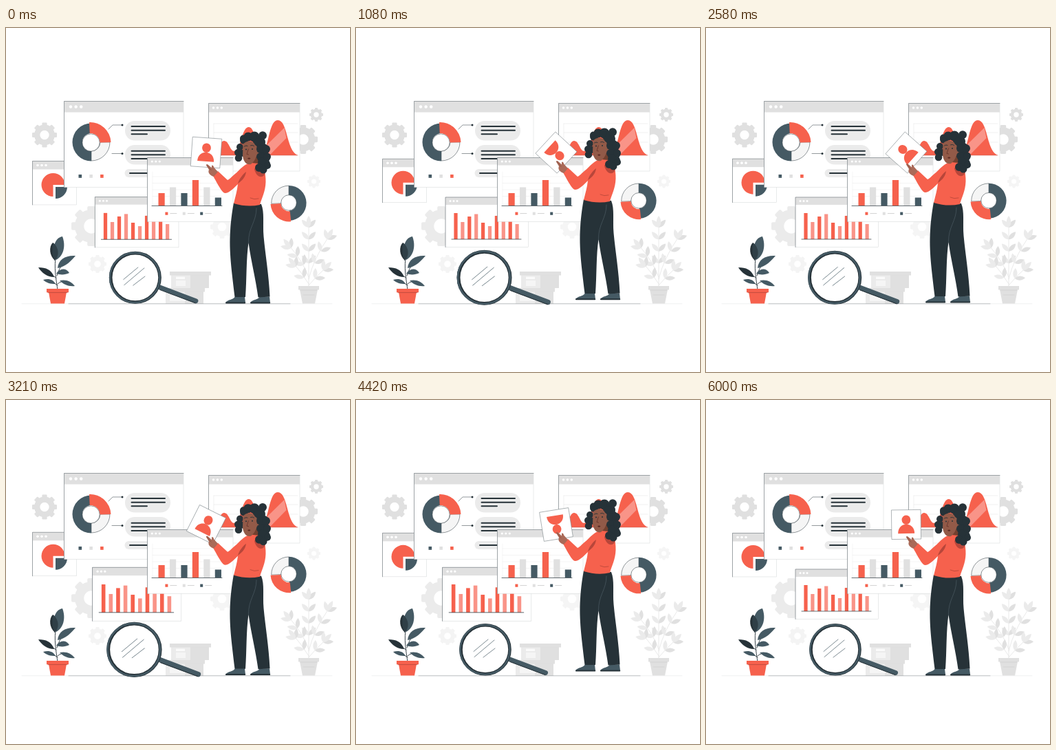
These frames come from a looping animation (500 px wide and 500 px high, 6.04 s). An HTML page:

```html
<!DOCTYPE html>
<html lang="en">
<head>
<meta charset="utf-8">
<style>
html, body { margin: 0; width: 100%; height: 100%; overflow: hidden; background: #fff; }
svg { display: block; width: 100vw; height: 100vh; }
</style>
</head>
<body>
<svg id="stage" viewBox="0 0 500 500"></svg>
<script>
const RED = '#f6614d', PINK = '#f99488', SLATE = '#455a64', INK = '#263238', GREY = '#e0e0e0', PALE = '#ebebeb';
const SKIN = '#925a48';
const LOOP = 6040, LEAD = 33;

const path = (d, fill, extra = '') => `<path d="${d}" fill="${fill}" ${extra}/>`;
const line = (d, color = INK, width = .7, extra = '') =>
  path(d, 'none', `stroke="${color}" stroke-width="${width}" stroke-linecap="round" ${extra}`);
const rect = (x, y, w, h, fill, extra = '') =>
  `<rect x="${x}" y="${y}" width="${w}" height="${h}" fill="${fill}" ${extra}/>`;
const dot = (x, y, r, fill, extra = '') => `<circle cx="${x}" cy="${y}" r="${r}" fill="${fill}" ${extra}/>`;
const group = (id, body) => `<g id="${id}">${body}</g>`;
const outline = `stroke="${INK}" stroke-width=".5"`;

// Angles run clockwise from the top.
function sector(cx, cy, R, r, from, to, fill, extra) {
  const at = (a, q) => {
    const k = a * Math.PI / 180;
    return `${(cx + q * Math.sin(k)).toFixed(2)} ${(cy - q * Math.cos(k)).toFixed(2)}`;
  };
  const big = to - from > 180 ? 1 : 0;
  return path(`M${at(from, R)}A${R} ${R} 0 ${big} 1 ${at(to, R)}L${at(to, r)}` +
    (r ? `A${r} ${r} 0 ${big} 0 ${at(from, r)}` : '') + 'Z', fill, extra);
}

function gear(x, y, R, fill) {
  let teeth = '';
  for (let i = 0; i < 8; i++)
    teeth += rect(-R * .2, -R, R * .4, R * .4, fill, `rx="${R * .07}" transform="rotate(${i * 45})"`);
  return `<g transform="translate(${x} ${y})">${teeth}` +
    `<circle r="${R * .6}" fill="none" stroke="${fill}" stroke-width="${R * .46}"/></g>`;
}

function panel(x, y, w, h, bar, dots, gap, r) {
  let s = rect(x, y, w, h, '#fff', 'stroke="#d2d5d6" stroke-width=".5"') + rect(x, y, w, bar, GREY) +
    line(`M${x} ${y + h}V${y}H${x + w}`, '#6c757a', .6);
  for (let i = 0; i < 3; i++) s += dot(dots + i * gap, y + bar / 2, r, '#fff');
  return s;
}

function leaf(x, y, len, wid, angle, fill) {
  return path(`M0 0C${-wid} ${-len * .3} ${-wid * .8} ${-len * .7} 0 ${-len}C${wid * .8} ${-len * .7} ${wid} ${-len * .3} 0 0Z`,
    fill, `transform="translate(${x} ${y}) rotate(${angle})"`);
}

function backdrop() {
  return gear(56, 155.5, 18, GREY) + gear(451, 126, 10, GREY) + gear(432, 162, 21, GREY) +
    gear(447.5, 223, 9.5, '#f5f5f5') + gear(124, 288, 29, PALE) +
    gear(133, 343, 13, '#f4f4f4') + gear(314, 289, 17, '#f5f5f5');
}

function piePanel() {
  return panel(38.5, 193.5, 64, 63.5, 12, 46, 6, 1.8) +
    sector(68.5, 228, 17, 0, 180, 450, RED) + sector(72, 231, 17, 0, 90, 180, SLATE);
}

function donutPanel() {
  let s = panel(84.5, 106.5, 173.5, 125, 16, 94, 7.6, 2.2);
  s += sector(124, 166, 27, 13, 90, 180, '#f5f5f5', outline) +
    sector(124, 166, 27.5, 13, 180, 360, SLATE) +
    sector(122.5, 167, 30, 14, -3, 88, RED) +
    dot(123.5, 166.5, 12.6, '#fff', outline) +
    line('M149 147L155 141H168M154 182.5H168', INK, .5) + dot(169, 141, 1.5, INK) + dot(169, 182.5, 1.5, INK);
  [SLATE, GREY, RED].forEach((c, i) => s += rect(105.5 + i * 15.8, 213, 4.6, 4.8, c));
  s += rect(173, 135, 66, 28.5, PALE, 'rx="14"') + rect(173, 170, 66, 28.5, PALE, 'rx="14"') +
    rect(172.5, 205, 60, 12, PALE, 'rx="6"');
  return s + line('M182.5 143H231M182.5 148.8H231M182.5 154.3H205M182.5 178.8H231M182.5 184.3H231M182.5 190H205M180 211H215', INK, 1.9);
}

function hillPanel() {
  return panel(294.5, 109.5, 132.5, 98.5, 13, 301.5, 5.9, 1.8) +
    line('M302 139V185M302 139H424M302 152H424M302 166H424', '#e3e3e3', .5) +
    path('M302 185C309 182 310 164 317 164C325 164 326 183 334 178C342 172 343 144 353 144C363 144 364 181 371 181C382 181 381 134 395 134C410 134 407 178 424 185Z', RED) +
    path('M376 173L404.5 145L407.5 160L384 184H372Z', PINK) +
    line('M302 185H424', '#c85a4d', .5);
}

function barPanel() {
  let s = panel(130, 246, 120.3, 72.5, 11, 137, 5, 1.5);
  [269, 282, 274, 270.5, 283, 288, 273, 281, 280.5, 285].forEach((y, i) =>
    s += rect(142.4 + i * 9.9, y, 5.2, 307 - y, i % 2 ? PINK : RED));
  return s + line('M139 307H240');
}

function columnPanel() {
  let s = panel(205.5, 188.5, 124.5, 93, 11, 212.3, 5.5, 1.6);
  s += line('M213 216H314M213 225.5H314M213 235H314M213 244.5H314M213 209V258', '#e8e8e8', .5);
  [240, 231.5, 240, 221, 231.5, 246.5].forEach((y, i) =>
    s += rect(221.5 + i * 16.45, y, 9.2, 258.3 - y, [RED, GREY, SLATE][i % 3]));
  s += line('M212 258.5H314');
  [RED, GREY, SLATE].forEach((c, i) => {
    const x = 231.4 + i * 25.4;
    s += rect(x, 267.6, 4, 4.2, c) + line(`M${x + 7.5} 269.6h9`, '#c4c4c4', .8);
  });
  return s;
}

function ring() {
  return sector(411, 254.5, 25.3, 11, 268, 360, '#f5f5f5', outline) +
    sector(411, 254.5, 25.5, 11, 0, 177, SLATE) +
    sector(411.5, 254.5, 27, 12, 174, 267, RED) + dot(411, 254, 11.2, '#fff', outline);
}

function boxes() {
  return rect(240, 359, 55, 19, PALE) + rect(268, 359, 27, 19, GREY) + rect(238, 354, 60, 5.5, GREY) +
    rect(247, 361.5, 13, 3.5, '#fafafa') + rect(247, 367, 14, 8, '#f5f5f5') +
    rect(232, 383, 55, 17.5, PALE) + rect(260, 383, 27, 17.5, GREY) + rect(230, 378, 59, 5.5, GREY) +
    rect(238, 389, 23, 8, '#f5f5f5');
}

function pottedPlant() {
  return line('M75 381C73 365 69 348 73 328M74 360Q77 349 84 341M73 363Q70 361 62 357M75 374Q70 370 66 369M75 372Q80 367 87 369', INK, .9) +
    path('M71 338C63 331 62 318 68 312C77 319 78 331 71 338Z', INK) +
    path('M73 337C66 322 70 305 82 303C87 316 84 331 73 337Z', SLATE) +
    path('M71 338C66 331 67 318 68.5 312C77 319 78 331 71 338Z', '#2f3f47') +
    path('M75 349C76 336 87 330 101 331C95 338 87 347 75 349Z', SLATE) +
    path('M70 362C66 351 58 348 47 348C52 356 60 362 70 362Z', INK) +
    path('M73 357C78 349 87 348 92 356C86 359 79 359 73 357Z', SLATE) +
    path('M72 372C68 365 62 364 54 366C59 371 65 372 72 372Z', SLATE) +
    path('M78 367C87 365 95 368 100 375C91 376 84 373 78 367Z', SLATE) +
    path('M62 384H88L85 400.5H65Z', RED) + rect(59, 379, 32, 5.3, RED) + line('M61 384.6H89', '#b5473a', .8);
}

function palePlant() {
  let s = line('M440 376V277M440 365Q447 335 468 305M440 362Q432 340 413 318M440 374Q450 362 462 351M440 372Q430 356 418 342', GREY, .7);
  // Each branch: start, end, number of leaf pairs.
  [[440, 342, 440, 290, 4], [449, 342, 467, 307, 3], [433, 344, 414, 320, 3], [449, 364, 461, 352, 2], [433, 363, 421, 347, 2]].forEach(([x0, y0, x1, y1, n]) => {
    const lean = Math.atan2(x1 - x0, y0 - y1) * 180 / Math.PI;
    for (let i = 0; i < n; i++) {
      const q = i / (n - 1), x = x0 + (x1 - x0) * q, y = y0 + (y1 - y0) * q;
      s += leaf(x, y, 15, 4.6, lean - 42, PALE) + leaf(x, y, 15, 4.6, lean + 42, GREY);
    }
    s += leaf(x1, y1, 17, 4.8, lean, PALE);
  });
  return s + path('M427 380H453L449 400.5H431Z', GREY) + rect(425, 375, 30, 5.5, GREY) +
    line('M428 381H452M432 388H448', '#cfcfcf', .7);
}

function magnifier() {
  return line('M221 376L275.5 396.5', SLATE, 7) + line('M224 380.5L275 399.5', INK, 1) +
    dot(188, 362.8, 35.5, '#fff', `stroke="${INK}" stroke-width="4.6"`) +
    dot(187.5, 362.8, 36, 'none', `stroke="${SLATE}" stroke-width="2.6"`) +
    line('M171 365.5L192 348M172 373.5L201 349M185 374L202 361', SLATE, .7);
}

function card() {
  return rect(269.7, 159.7, 42.6, 42.6, '#fff', 'stroke="#7d868a" stroke-width=".6"') +
    `<ellipse cx="291" cy="174.2" rx="6.4" ry="6.8" fill="${RED}"/>` +
    path('M279 194C279 176.5 303 176.5 303 194Z', RED);
}

function woman() {
  const shoe = x => path(`M${x} 399.2C${x + 4} 394 ${x + 10} 396 ${x + 14} 390.5H${x + 28}L${x + 29} 399.2Z`, SLATE) +
    rect(x, 398.4, 29.2, 2, INK, 'rx=".8"');
  const curls = list => list.map(([x, y, r]) => dot(x, y, r, INK)).join('');
  let s = shoe(319) + shoe(355);
  s += path('M331 254L371 256C376 268 373 284 374.5 303C377 330 382 358 383.5 390.5L366.5 391.5C363 365 356 338 352.5 312C349 335 350 365 348 391L332.5 391C328 352 324 325 326 295C327 278 329 265 331 254Z', INK) +
    line('M364 262C364 282 352 290 352.5 312', '#53626a', .6);
  s += curls([[346, 163, 6], [352, 158, 6.5], [361, 158, 7.5], [368, 166, 9], [373, 156.3, 6], [372, 177, 10], [375, 188, 9],
    [376, 198, 8], [370, 199, 9], [367, 190, 9], [340, 173, 5], [337, 181, 5], [338, 189, 5.3], [343, 182, 5]]);
  s += path('M353 188L366 187L368 202L355 203Z', '#73402f') +
    path('M357 196C347 196 339 207 333 212C328 216 325 220 322 221L308 208L301 215C306 224 311 234 316 239C320 242 326 238 337 227C336 237 333 246 331 255Q351 261 369 257C372 246 377 238 377.5 224C378 210 374 199 366 197Z', RED) +
    path('M337 226C339 219 344 213 349 209C348 217 343 222 337 226Z', '#b8463a') +
    path('M361 205C363 215 371 220 376 213L378 207L366 199Z', '#b8463a') +
    line('M355 247Q361 250 367 248', '#9e3d32', .6);
  s += path('M302 216C296 214 293 210 295 206L291 199.5Q291 197 293.5 198.5L299 203.5L299 200Q301 198 302.5 203L308 209Z', '#aa6a58') +
    line('M291.8 199L298 206.5', '#73402f', .5);
  s += path('M344.5 169C350 162 361 164 364.5 172C366.5 182 363 193 356 198C349 200 344.5 193 344 185Z', SKIN) +
    path('M364 181q5 -4 5 1t-6 5z', SKIN) +
    line('M346.5 172q2.5-1.8 4.5-.6M355.5 170.8q3-1.2 5 .6', INK, .9) +
    line('M352.3 176L350 183.5L352.5 184', '#5b2a23', .7) +
    dot(349, 176.5, 1, INK) + dot(358, 176, 1, INK) + path('M351 189.5q2-2 4.5-.2q-2 3-4.5.2z', '#5b2a23');
  return s + curls([[345, 160.5, 5], [351, 157, 5], [359, 159, 5.5], [366, 166, 5.5], [370, 176, 6], [370, 187, 6],
    [373, 195, 7], [379.5, 187, 5.5], [378, 176, 6], [380, 200, 5], [368, 203, 6], [374, 206, 5.5]]);
}

const ground = line('M23 400.8H474', INK, .6, 'opacity=".12"') + line('M91 400.8H413', INK, .6, 'opacity=".45"');

const stage = document.getElementById('stage');
stage.innerHTML = backdrop() + group('pie', piePanel()) + donutPanel() + hillPanel() +
  group('bars', barPanel()) + columnPanel() + group('ring', ring()) + boxes() + ground +
  pottedPlant() + palePlant() + group('lens', magnifier()) + group('card', card()) + group('woman', woman());

const move = (id, value) => document.getElementById(id).setAttribute('transform', value);
const lift = (p, height) => `translate(0 ${-height * (1 - Math.cos(2 * Math.PI * p)) / 2})`;
const zoom = (x, y, k) => `translate(${x} ${y}) scale(${k}) translate(${-x} ${-y})`;

// Two beats: peaks at 10% and 50% of the cycle.
function beat(p) {
  p %= 1;
  if (p < .1) return 1 + p;
  if (p < .3) return 1.1 - (p - .1) / 2;
  return 1 + Math.max(0, .1 - Math.abs(p - .5));
}

function draw(now) {
  const p = ((now + LEAD) % LOOP) / LOOP;
  move('card', `rotate(${720 * p} 291 181)`);
  move('woman', lift(2 * p, 6));
  move('pie', lift(4 * p, 6));
  move('ring', lift(4 * p, 6));
  move('bars', zoom(190, 282.3, beat(2 * p)));
  move('lens', zoom(213, 362.5, beat(p)));
  requestAnimationFrame(draw);
}
draw(0);
</script>
</body>
</html>
```
